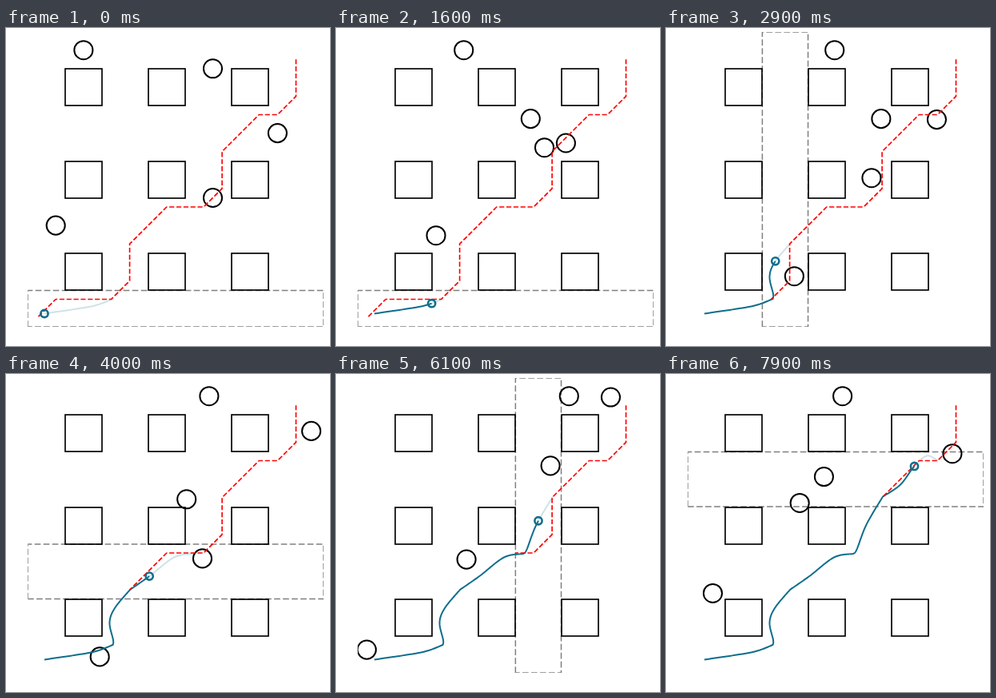
These frames come from a looping animation (405x398 px, 8 s). An HTML page with a canvas:

```html
<!DOCTYPE html>
<html lang="en">
<head>
<meta charset="utf-8">
<title>Corridor planner</title>
<style>
  html, body { margin: 0; width: 100%; height: 100%; overflow: hidden; background: #fff; }
  canvas { display: block; width: 405px; height: 398px; }
</style>
</head>
<body>
<canvas id="stage"></canvas>
<script>
const W = 405, H = 398, STEP = 100, FRAMES = 80;
const AREA = { left: 27.2, top: 5, right: 397, bottom: 374 };
const CELL = 11.55, BLOCK = 4 * CELL, SPEED = 3.925;
const TEAL = '#0e6e8c';

const canvas = document.getElementById('stage');
const ctx = canvas.getContext('2d');
const ratio = window.devicePixelRatio || 1;
canvas.width = W * ratio;
canvas.height = H * ratio;
ctx.scale(ratio, ratio);

// Left and right, or top and bottom, of the n-th block in a row or column
const blockX = n => [74, 120].map(x => x + 9 * CELL * n);
const blockY = n => [51, 97].map(y => y + 10 * CELL * n);
const snap = v => Math.round(v);

// Free strips between the blocks
const across = n => [AREA.left, blockY(n)[1] + 0.5, AREA.right,
  n < 2 ? blockY(n + 1)[0] - 0.5 : AREA.bottom];
const upright = n => [blockX(n)[1] + 0.4, AREA.top, blockX(n + 1)[0] - 0.4, AREA.bottom];

// Route from start to goal in grid cells
const route = [[0, 0], [2, 2], [8, 2], [10, 4], [10, 8], [14, 12], [16, 12], [18, 12],
  [20, 14], [20, 18], [24, 22], [26, 22], [28, 24], [28, 28]]
  .map(([col, row]) => [39.1 + col * CELL, 362.6 - row * CELL]);

// Each leg: end time, corridor, first route point still shown, bends of the curve
const legs = [
  { end: 19.3, box: across(2), from: 0, bends: [[48, 357.5], [98, 350], [117, 345.6], [133.5, 339]] },
  { end: 34.6, box: upright(0), from: 2, bends: [[134, 333], [129.5, 311], [136, 293], [155, 270]] },
  { end: 51.6, box: across(1), from: 4, bends: [[180, 252.5], [210, 229.5], [234, 225]] },
  { end: 68.2, box: upright(1), from: 6, bends: [[238.5, 219.5], [250.5, 188.5], [271, 153.5]] },
  { end: 86, box: across(0), from: 9, bends: [[293, 138.5], [310, 116], [326, 102.5], [340, 108.5]] }
];
legs.forEach((leg, i) => {
  const before = legs[i - 1];
  leg.start = before ? before.end : 0;
  leg.curve = smooth(before ? [before.bends[before.bends.length - 1], ...leg.bends] : leg.bends);
});

// Obstacles run at constant speed on each axis, back and forth between these stops
const movers = [
  { x: [96.9, 313.8, 0], y: [27.7] },
  { x: [62.2, 168.2, 36.6, 61.7, 36.4, 400], y: [247.1, 222, 365.3, 339.6, 365, 0] },
  { x: [258.5, 272, 233, 281.6, 224, 286.4, 0], y: [50.8, 120.3, 94.8, 157.2, 95, 157, 0] },
  { x: [339.4, 282, 386.3, 326, 386, 0], y: [131.6, 106.4, 154.8, 9, 400] },
  { x: [258.5, 235.2, 267.6, 233.2, 272.8, 129.8, 400], y: [212.5, 143.2, 272.7, 0] }
];

function zigzag(stops, t) {
  let left = SPEED * t, pos = stops[0];
  for (const stop of stops.slice(1)) {
    const move = Math.min(left, Math.abs(stop - pos));
    pos += Math.sign(stop - pos) * move;
    left -= move;
  }
  return pos;
}

function catmull(a, b, c, d, u) {
  return 0.5 * (2 * b + (c - a) * u + (2 * a - 5 * b + 4 * c - d) * u * u
    + (3 * b - a - 3 * c + d) * u * u * u);
}

// Fine polyline through the given points
function smooth(points) {
  const at = i => points[Math.max(0, Math.min(points.length - 1, i))];
  const out = [points[0]];
  for (let i = 0; i < points.length - 1; i++)
    for (let u = 1; u <= 16; u++)
      out.push([0, 1].map(k => catmull(at(i - 1)[k], at(i)[k], at(i + 1)[k], at(i + 2)[k], u / 16)));
  return out;
}

// Cuts a polyline at a share of its length
function split(points, share) {
  const gap = i => Math.hypot(points[i][0] - points[i - 1][0], points[i][1] - points[i - 1][1]);
  let left = 0, i = 1;
  for (let k = 1; k < points.length; k++) left += gap(k);
  left *= share;
  while (i < points.length - 1 && left > gap(i)) left -= gap(i++);
  const u = left / gap(i);
  const mid = [0, 1].map(k => points[i - 1][k] + (points[i][k] - points[i - 1][k]) * u);
  return { done: [...points.slice(0, i), mid], mid, ahead: [mid, ...points.slice(i)] };
}

function line(points, color, width, dash = []) {
  ctx.beginPath();
  points.forEach(([x, y]) => ctx.lineTo(x, y));
  ctx.strokeStyle = color;
  ctx.lineWidth = width;
  ctx.setLineDash(dash);
  ctx.stroke();
  ctx.setLineDash([]);
}

function ring(x, y, r, color, width) {
  ctx.beginPath();
  ctx.arc(x, y, r, 0, Math.PI * 2);
  ctx.strokeStyle = color;
  ctx.lineWidth = width;
  ctx.stroke();
}

function drawBlocks() {
  ctx.strokeStyle = '#000';
  ctx.lineWidth = 1.67;
  for (let col = 0; col < 3; col++)
    for (let row = 0; row < 3; row++) {
      const [x0, x1] = blockX(col).map(snap), [y0, y1] = blockY(row).map(snap);
      ctx.strokeRect(x0, y0, x1 - x0, y1 - y0);
    }
}

function draw(t) {
  const now = legs.findIndex(leg => t <= leg.end);
  const leg = legs[now];
  const { done, mid, ahead } = split(leg.curve, (t - leg.start) / (leg.end - leg.start));
  const trail = [...legs.slice(0, now).flatMap(l => l.curve), ...done];

  ctx.fillStyle = '#fff';
  ctx.fillRect(0, 0, W, H);
  ctx.save();
  ctx.beginPath();
  ctx.rect(AREA.left, AREA.top, AREA.right - AREA.left, AREA.bottom - AREA.top);
  ctx.clip();

  const [l, top, r, bottom] = leg.box;
  line([[l, bottom], [l, top], [r, top], [r, bottom], [l, bottom]], 'rgba(0,0,0,0.5)', 1.5, [7.7, 3.3]);
  drawBlocks();
  movers.forEach(m => ring(zigzag(m.x, t), zigzag(m.y, t), CELL, '#000', 2));

  ctx.lineJoin = 'round';
  line(ahead, 'rgba(14,110,140,0.2)', 2);
  line(trail, TEAL, 2);
  line(route.slice(leg.from).reverse(), '#f00', 1.67, [6.17, 2.67]);
  ring(...mid, 4.6, TEAL, 2.6);
  ctx.restore();
}

const start = performance.now();
let shown = -1;
function tick() {
  const frame = Math.floor((performance.now() - start) / STEP) % FRAMES;
  if (frame !== shown) draw(shown = frame);
  requestAnimationFrame(tick);
}
tick();
</script>
</body>
</html>
```
